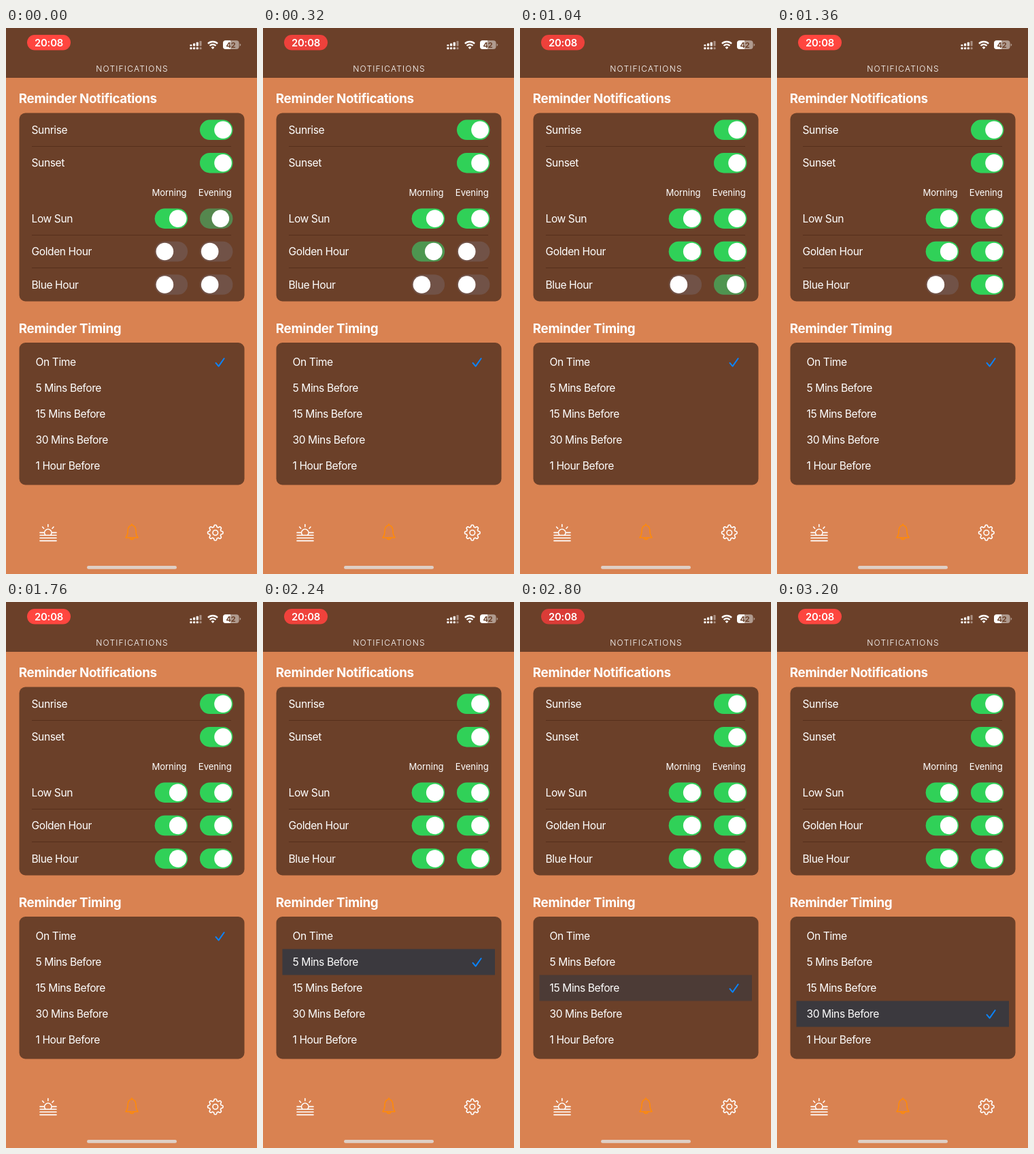
Write an HTML page that moves like this. It is 369 px wide and 800 px high and loops after 3.28 s.

```html
<!DOCTYPE html>
<html lang="en">
<head>
<meta charset="utf-8">
<title>Notifications</title>
<style>
@property --on { syntax: "<number>"; inherits: true; initial-value: 0; }

html, body { margin: 0; width: 100%; height: 100%; overflow: hidden; background: #d98251; }
svg { display: block; width: 369px; height: 800px; }
text { font-family: Inter, Roboto, sans-serif; fill: #fff; }
.row { font-size: 15.6px; letter-spacing: -.42px; }
.title { font-size: 18.8px; font-weight: 700; letter-spacing: -.35px; }
.col { font-size: 13.1px; letter-spacing: -.05px; text-anchor: middle; }
.head { font-size: 12px; font-weight: 300; letter-spacing: 1.2px; }
.clock { font-size: 14.8px; font-weight: 600; letter-spacing: -.2px; text-anchor: middle; }
.charge { font-size: 11px; font-weight: 700; letter-spacing: -.2px; text-anchor: middle; fill: #6b4029; }
.brown { fill: #6b4029; }
.line { fill: none; stroke: #fff; stroke-width: 1.6; stroke-linecap: round; stroke-linejoin: round; }

/* switches: --on runs linearly, the knob eases out ahead of the tint */
.track { fill: #715247; }
.tint { fill: #30d158; opacity: var(--on); }
.knob {
  --off: calc(1 - var(--on));
  fill: #fff;
  transform: translateX(calc(19.3px * (1 - var(--off) * var(--off) * var(--off))));
}
.always { --on: 1; }
.loop { animation: 3280ms linear infinite; }
.lowEve { animation-name: lowEve; }
.goldMorn { animation-name: goldMorn; }
.goldEve { animation-name: goldEve; }
.blueEve { animation-name: blueEve; }
.blueMorn { animation-name: blueMorn; }
@keyframes lowEve { 0% { --on: .42 } 5.3%, 100% { --on: 1 } }
@keyframes goldMorn { 0%, 4.88% { --on: 0 } 14.02%, 100% { --on: 1 } }
@keyframes goldEve { 0%, 13.57% { --on: 0 } 22.71%, 100% { --on: 1 } }
@keyframes blueEve { 0%, 26.98% { --on: 0 } 36.13%, 100% { --on: 1 } }
@keyframes blueMorn { 0%, 42.38% { --on: 0 } 51.52%, 100% { --on: 1 } }

/* timing list */
.press { fill: #3b393e; opacity: 0; }
.press5 { animation-name: press5; }
.press15 { animation-name: press15; }
.press30 { animation-name: press30; }
@keyframes press5 { 0%, 65.24% { opacity: 0 } 65.25%, 70.1% { opacity: 1 } 78.05%, 100% { opacity: 0 } }
@keyframes press15 { 0%, 79.88% { opacity: 0 } 79.89%, 82.01% { opacity: 1 } 91.46%, 100% { opacity: 0 } }
@keyframes press30 { 0%, 94.51% { opacity: 0 } 94.52%, 100% { opacity: 1 } }
.check { stroke: #0a84ff; stroke-width: 2; animation-name: check; animation-timing-function: step-end; }
@keyframes check {
  0% { transform: translateY(0) }
  67.07% { transform: translateY(38px) }
  81.7% { transform: translateY(76px) }
  96.34%, 100% { transform: translateY(114px) }
}

.pill { animation-name: pulse; animation-timing-function: ease-in-out; }
@keyframes pulse {
  0%, 3% { fill: #ff463f }
  17%, 23% { fill: #da3c37 }
  39.6%, 59.8% { fill: #ff463f }
  78%, 84.1% { fill: #da3c37 }
  100% { fill: #ff463f }
}
</style>
</head>
<body>
<svg viewBox="0 0 369 800">
  <rect width="369" height="800" fill="#d98251"/>
  <rect class="brown" width="369" height="73"/>

  <rect class="pill loop" x="31" y="10" width="64" height="22.5" rx="11.25"/>
  <text class="clock" x="63" y="26.6">20:08</text>
  <text class="head" x="132.2" y="63.5">NOTIFICATIONS</text>

  <g id="signal" fill="#fff"></g>
  <g fill="none" stroke="#fff" stroke-width="2.3">
    <path d="M296.9 22.9a10.2 10.2 0 0 1 14.2 0M299.5 26a6.4 6.4 0 0 1 9 0"/>
    <path d="M304 31l-2.4-2.6a3.4 3.4 0 0 1 4.8 0z" fill="#fff" stroke="none"/>
  </g>
  <clipPath id="cell"><rect x="319" y="18.3" width="23.6" height="12.8" rx="4"/></clipPath>
  <g clip-path="url(#cell)">
    <rect x="319" y="18" width="24" height="14" fill="#b09b8f"/>
    <rect x="319" y="18" width="11" height="14" fill="#fff"/>
  </g>
  <path d="M343.6 22.7q1.7.6 1.7 2t-1.7 2z" fill="#b09b8f"/>
  <text class="charge" x="330.6" y="28.8">42</text>

  <text class="title" x="18.8" y="110.2">Reminder Notifications</text>
  <rect class="brown" x="19.5" y="124.5" width="331" height="276" rx="9"/>
  <path d="M38 173.5H331M38 303.5H331M38 351.5H331" stroke="#562f1c"/>
  <text class="col" x="240" y="245.8">Morning</text>
  <text class="col" x="307.3" y="245.8">Evening</text>
  <g id="switches"></g>

  <text class="title" x="18.8" y="446.7">Reminder Timing</text>
  <rect class="brown" x="19.5" y="461" width="331" height="208.5" rx="9"/>
  <rect class="press press5 loop" x="28.5" y="508.5" width="312.5" height="38"/>
  <rect class="press press15 loop" x="28.5" y="546.5" width="312.5" height="38"/>
  <rect class="press press30 loop" x="28.5" y="584.5" width="312.5" height="38"/>
  <g id="labels"></g>
  <path class="line check loop" d="M308.6 490.8l4 4.8 8-11.4"/>

  <g class="line">
    <path d="M50 743.2H74M50 747.3H74M50 751.4H74M50 739.4H56.4M67.6 739.4H74"/>
    <path d="M57.7 742.8a5.2 5.2 0 1 1 8.2 0"/>
    <path d="M61.8 727.6v3.2M53.6 731l2 2.2M70 731l-2 2.2"/>
  </g>
  <g class="line" style="stroke:#ff8a0a">
    <path d="M185 728.2c-4.6 1.2-6 4.6-6 8.6 0 5-1 7.4-3 10h18c-2-2.6-3-5-3-10 0-4-1.4-7.4-6-8.6z"/>
    <path d="M185 726.8v1.2M182.2 747.2a2.9 2.9 0 0 0 5.6 0"/>
  </g>
  <g class="line" transform="translate(307.8 739.5)">
    <path id="gear"/>
    <circle r="3.8"/>
  </g>
  <rect x="119" y="788" width="132" height="4.8" rx="2.4" fill="#dfcfc6"/>
</svg>
<script>
const put = (id, html) => document.getElementById(id).innerHTML = html;

const label = (x, y, s) => `<text class="row" x="${x}" y="${y + 5.6}">${s}</text>`;

const toggle = (x, y, state) => `
  <g transform="translate(${x} ${y - 14.7})"><g class="loop ${state}">
    <rect class="track" width="48.4" height="29.4" rx="14.7"/>
    <rect class="tint" width="48.4" height="29.4" rx="14.7"/>
    <circle class="knob" cx="14.7" cy="14.7" r="12.8"/>
  </g></g>`;

// name, centre line, evening state, morning state
const rows = [
  ["Sunrise", 149.3, "always"],
  ["Sunset", 197.7, "always"],
  ["Low Sun", 279.2, "lowEve", "always"],
  ["Golden Hour", 327.5, "goldEve", "goldMorn"],
  ["Blue Hour", 376, "blueEve", "blueMorn"]
];
put("switches", rows.map(([name, y, eve, morn]) =>
  label(37.5, y, name) + toggle(285, y, eve) + (morn ? toggle(218.7, y, morn) : "")).join(""));

const times = ["On Time", "5 Mins Before", "15 Mins Before", "30 Mins Before", "1 Hour Before"];
put("labels", times.map((s, i) => label(43.5, 489.6 + 38 * i, s)).join(""));

put("signal", [2.4, 4, 5.8, 7.6].map((h, i) => {
  const x = 270.3 + 4.7 * i;
  return `<g opacity="${i < 3 ? 1 : .4}">
    <rect x="${x}" y="${26.6 - h}" width="3.2" height="${h}" rx=".8"/>
    <rect x="${x}" y="28.2" width="3.2" height="3" rx=".8"/></g>`;
}).join(""));

// eight soft teeth
const teeth = Array.from({ length: 160 }, (_, i) => {
  const a = i * Math.PI / 80;
  const r = 9.9 + 1.4 * Math.tanh(2 * Math.cos(8 * a));
  return (r * Math.cos(a)).toFixed(2) + " " + (r * Math.sin(a)).toFixed(2);
});
document.getElementById("gear").setAttribute("d", "M" + teeth.join("L") + "Z");
</script>
</body>
</html>
```
